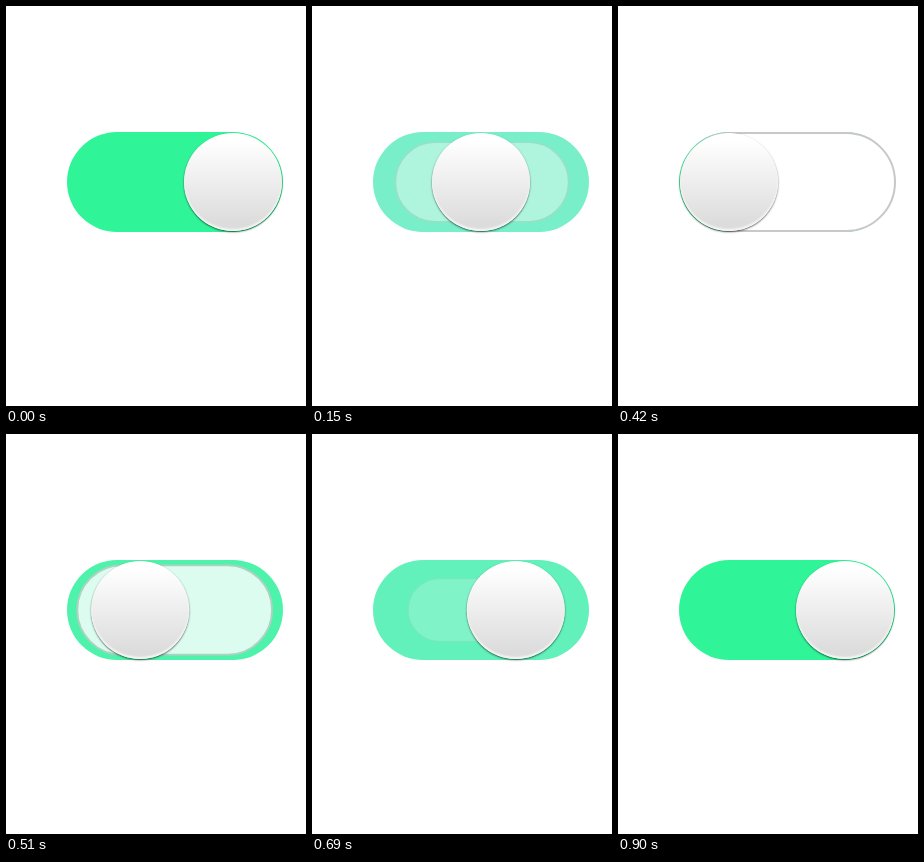
Recreate the animation shown at these times as an HTML page. Size 300 by 400 pixels, loop 0.93 s.

```html
<!DOCTYPE html>
<html lang="en">
<head>
<meta charset="utf-8">
<title>Toggle switch</title>
<style>
  html, body { margin: 0; width: 100%; height: 100%; overflow: hidden; background: #fff; }
  div { position: absolute; box-sizing: border-box; }
  #track, #hole { left: 61px; top: 126px; width: 216px; height: 100px; border-radius: 50px; }
  #hole { background: #fff; border: 2px solid #c8c8c8; }
  #knob {
    left: 62px; top: 127px; width: 98px; height: 98px; border-radius: 50%;
    background: linear-gradient(#fff 8%, #dcdcdc 92%);
    box-shadow: 0 1px 2px rgba(0, 0, 0, .65), inset 0 -2px 2px rgba(255, 255, 255, .75);
  }
</style>
</head>
<body>
<div id="track"></div>
<div id="hole"></div>
<div id="knob"></div>
<script>
  const LOOP = 930, STEP = 30, HALF = 450, SLIDE = 300, PULSE_PEAK = 150, TRAVEL = 116;
  const GREEN = [48, 245, 152], PALE = [120, 239, 200];
  const [track, hole, knob] = ['track', 'hole', 'knob'].map(id => document.getElementById(id).style);
  const mix = (a, b, k) => a + (b - a) * k;

  function draw(ms) {
    const t = Math.floor(ms % LOOP / STEP) * STEP;
    const closing = t < HALF;
    const since = closing ? t : t - HALF;
    const p = Math.min(since / SLIDE, 1);

    // the track pales quickly after each toggle and recovers slowly
    const pulse = since < PULSE_PEAK
      ? since / PULSE_PEAK
      : Math.max(0, (HALF - since) / (HALF - PULSE_PEAK));
    track.background = `rgb(${GREEN.map((c, i) => Math.round(mix(c, PALE[i], pulse)))})`;

    const scale = closing ? mix(.62, 1, p) : mix(1, .55, p);
    const shift = closing ? 1 : mix(1, -5.75, p);
    hole.transform = `translateX(${shift}px) scale(${scale})`;
    hole.opacity = closing ? p ** 1.3 : 1 - p;

    knob.transform = `translateX(${TRAVEL * (closing ? 1 - p : p)}px)`;
  }

  const start = performance.now();
  function tick() {
    draw(performance.now() - start);
    requestAnimationFrame(tick);
  }
  tick();
</script>
</body>
</html>
```
